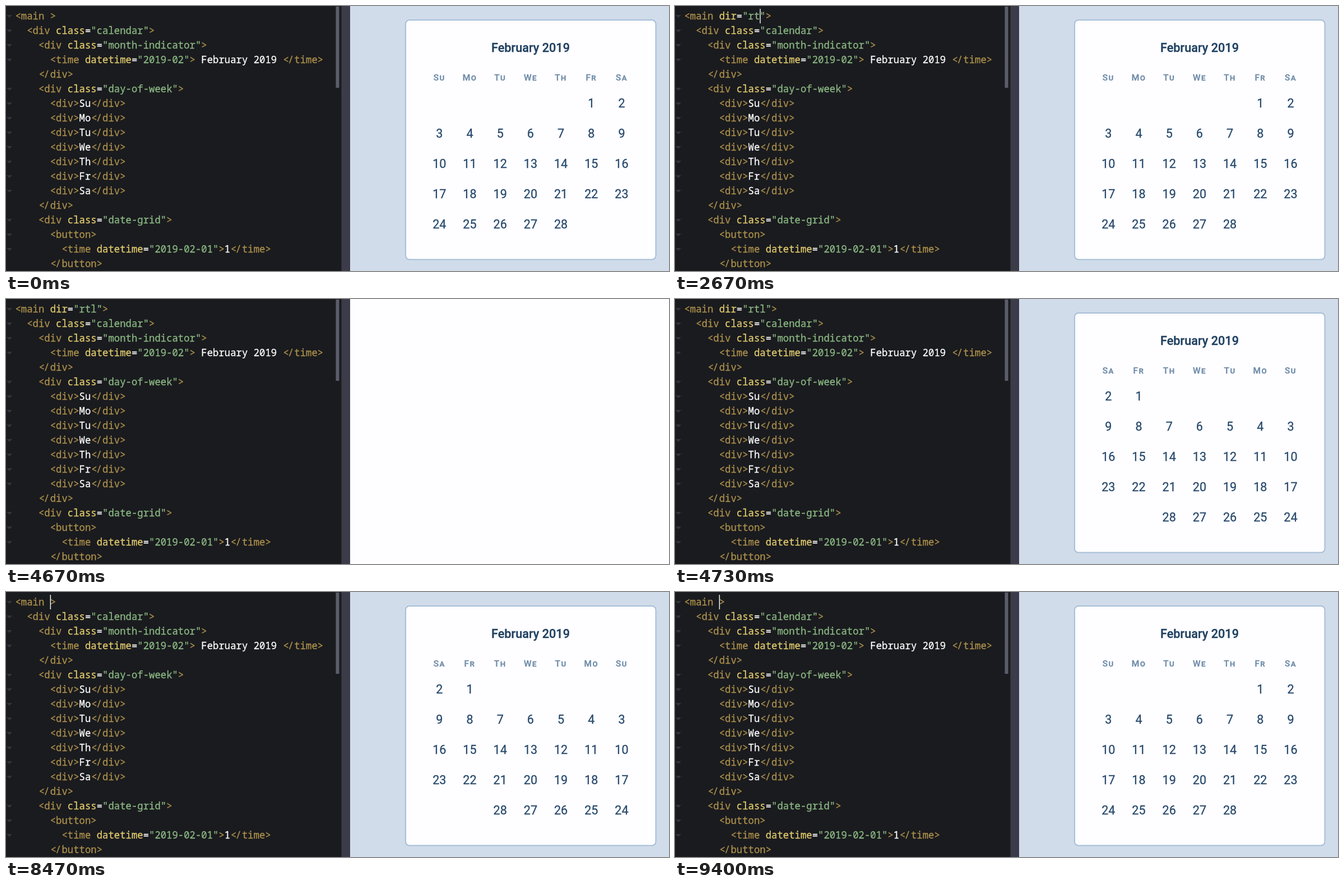
Recreate the animation shown at these times as an HTML page. Size 1183x473 px, loop 9.47 s.

```html
<!DOCTYPE html>
<html lang="en">
<head>
<meta charset="utf-8">
<title>Calendar direction demo</title>
<style>
  html, body { margin: 0; width: 100%; height: 100%; overflow: hidden; background: #1a1b1f; }
  svg { display: block; width: 100%; height: 100%; }
  .code { font: 17.3px "Noto Sans Mono", monospace; white-space: pre; font-variant-ligatures: none; stroke-width: .3; }
  .plain { fill: #fff; stroke: #fff; }
  .tag { fill: #ad914b; stroke: #ad914b; }
  .attr { fill: #e2cc6e; stroke: #e2cc6e; }
  .str { fill: #8bb983; stroke: #8bb983; }
  .title { font: 500 21.7px Roboto, sans-serif; fill: #1f4060; stroke: #1f4060; stroke-width: .3; text-anchor: middle; }
  .day { font: 500 15.5px Roboto, sans-serif; font-variant: small-caps; letter-spacing: 1.4px; fill: #6d8ba8; stroke: #6d8ba8; stroke-width: .3; text-anchor: middle; }
  .date { font: 21.6px Roboto, sans-serif; fill: #274a6d; stroke: #274a6d; stroke-width: .3; text-anchor: middle; }
</style>
</head>
<body>
<svg id="stage" viewBox="0 0 1183 473">
  <rect width="1183" height="473" fill="#1a1b1f"/>
  <g id="editor"></g>
  <rect id="caret" y="5" width="1.4" height="26" fill="#fff"/>
  <rect x="588.5" y="1" width="6" height="145" fill="#5b5d6b"/>
  <rect x="598.5" width="15.5" height="473" fill="#3b3b49"/>
  <rect x="614" width="569" height="473" fill="#fefdff"/>
  <g id="page">
    <rect x="614" width="569" height="473" fill="#d1dcea"/>
    <rect x="713" y="25" width="446.5" height="427.5" rx="7" fill="#fefdff" stroke="#a6bfd8" stroke-width="2"/>
    <text class="title" x="936" y="82">February 2019</text>
  </g>
</svg>
<script>
const LOOP = 9470, BLINK = 530;
const CHAR = 10.38, LEFT = 17, LINE = 26;
const ATTR = 'dir="rtl"';
const DAYS = ['Su', 'Mo', 'Tu', 'We', 'Th', 'Fr', 'Sa'];
const TYPE_START = 1700, KEY_STEP = 159.4;
const CUT = 6970, REFOCUS = 7140;
const reloads = [[4370, 4715], [8640, 8970]];

const $ = id => document.getElementById(id);
const editor = $('editor'), page = $('page'), caret = $('caret');

function add(parent, name, attrs, text) {
  const el = document.createElementNS('http://www.w3.org/2000/svg', name);
  for (const key in attrs) el.setAttribute(key, attrs[key]);
  if (text !== undefined) el.textContent = text;
  return parent.appendChild(el);
}

// Colours one line of markup; the closing "</" pair is drawn tight.
function highlight(el, line) {
  el.textContent = '';
  const token = /(<\/?[a-z]+|>)|("[^">]*"?)|([a-z]+(?=[=>]))|[^<>"a-z]+|[a-z]/g;
  for (const [part, tag, str, attr] of line.matchAll(token)) {
    const type = tag ? 'tag' : str ? 'str' : attr ? 'attr' : 'plain';
    if (part.startsWith('</')) {
      add(el, 'tspan', { class: type, dx: 0.8 }, '<');
      add(el, 'tspan', { class: type, dx: -1.8 }, '/');
      add(el, 'tspan', { class: type, dx: 1 }, part.slice(2));
    } else {
      add(el, 'tspan', { class: type }, part);
    }
  }
}

const source = [
  '<main >',
  '  <div class="calendar">',
  '    <div class="month-indicator">',
  '      <time datetime="2019-02"> February 2019 </time>',
  '    </div>',
  '    <div class="day-of-week">',
  ...DAYS.map(day => `      <div>${day}</div>`),
  '    </div>',
  '    <div class="date-grid">',
  '      <button>',
  '        <time datetime="2019-02-01">1</time>',
  '      </button>'
];

const lines = source.map((line, i) => {
  const mid = 18 + i * LINE;
  if (!line.trim().startsWith('</')) {
    add(editor, 'path', { d: `M1 ${mid - 2}h10l-5 5z`, fill: '#34353b' });
  }
  const el = add(editor, 'text', { class: 'code', x: LEFT - 0.5, y: mid + 6 });
  highlight(el, line);
  return el;
});

const cells = [];
function addCell(cls, col, y, text) {
  cells.push({ col, el: add(page, 'text', { class: cls, y }, text) });
}
DAYS.forEach((day, col) => addCell('day', col, 133, day));
for (let date = 1; date <= 28; date++) {
  const slot = date + 4;
  addCell('date', slot % 7, 181 + Math.floor(slot / 7) * 54.1, date);
}

function layout(rtl) {
  for (const { col, el } of cells) {
    el.setAttribute('x', 773.3 + (rtl ? 6 - col : col) * 54.2);
  }
}

// Characters of the attribute present at time t.
function attrLength(t) {
  if (t < TYPE_START || t >= CUT) return 0;
  return Math.min(ATTR.length, Math.floor((t - TYPE_START) / KEY_STEP) + 1);
}

// Time at which the caret last restarted its blinking.
function blinkStart(t, length) {
  if (t >= REFOCUS) return REFOCUS;
  if (t < TYPE_START) return -560;
  return TYPE_START + ((length || ATTR.length) - 1) * KEY_STEP;
}

let shownLine, shownDir;
function render(t) {
  const length = attrLength(t);
  const autoQuote = length >= 5 && length < 9 ? '"' : '';
  const line = `<main ${ATTR.slice(0, length)}${autoQuote}>`;
  if (line !== shownLine) highlight(lines[0], shownLine = line);

  const on = (t - blinkStart(t, length)) % (2 * BLINK) < BLINK;
  caret.setAttribute('visibility', on ? 'visible' : 'hidden');
  caret.setAttribute('x', LEFT + (6 + length) * CHAR - 0.6);

  const rtl = t >= reloads[0][0] && t < reloads[1][0];
  if (rtl !== shownDir) layout(shownDir = rtl);
  const blank = reloads.some(([from, to]) => t >= from && t < to);
  page.setAttribute('visibility', blank ? 'hidden' : 'visible');
}

const begin = performance.now();
function tick() {
  render((performance.now() - begin) % LOOP);
  requestAnimationFrame(tick);
}
tick();
</script>
</body>
</html>
```
